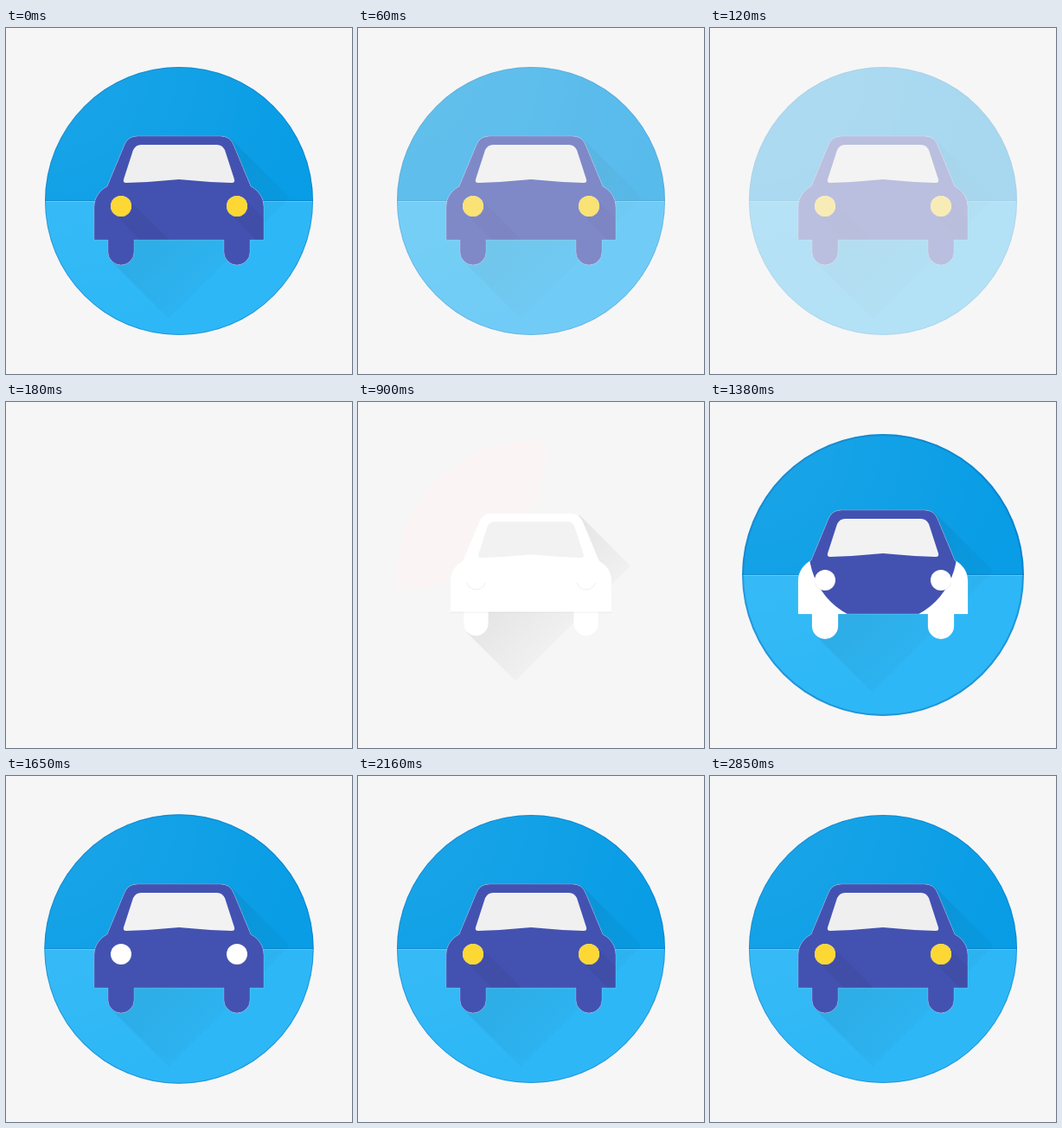
An HTML page with a canvas that plays this animation: 400x400 px, repeating every 2.97 s.

```html
<!DOCTYPE html>
<html lang="en">
<head>
<meta charset="utf-8">
<title>Car icon</title>
<style>
html, body { margin: 0; width: 100%; height: 100%; overflow: hidden; background: #f6f6f6; }
canvas { display: block; width: 400px; height: 400px; }
</style>
</head>
<body>
<canvas id="stage" width="400" height="400"></canvas>
<script>
const LOOP = 2970, STEP = 30, TAU = Math.PI * 2;
const ctx = document.getElementById('stage').getContext('2d');

const car = new Path2D('M102 245V207C102 196 108 188 117 183L137 135Q141 125 152 125H248' +
  'Q259 125 263 135L283 183C292 188 298 196 298 207V245H282V259a15 15 0 0 1-30 0V245' +
  'H148V259a15 15 0 0 1-30 0V245Z');
const glass = new Path2D('M156 135H244Q250 135 253 141L264 175Q265 179 261 179Q230 178 200 175' +
  'Q170 178 139 179Q135 179 136 175L147 141Q150 135 156 135Z');
const lamps = [133, 267], lampY = 206, lampR = 12;

const progress = (t, from, to) => Math.min(1, Math.max(0, (t - from) / (to - from)));
const mix = (a, b, p) => a + (b - a) * p;
const easeOut = (p, power) => 1 - (1 - p) ** power;
const easeInOut = p => p < 0.5 ? 2 * p * p : 1 - 2 * (1 - p) ** 2;

function circle(x, y, r) {
  const path = new Path2D();
  path.arc(x, y, r, 0, TAU);
  return path;
}

function polygon(...points) {
  const path = new Path2D();
  points.forEach(([x, y]) => path.lineTo(x, y));
  path.closePath();
  return path;
}

function fill(path, color) {
  ctx.fillStyle = color;
  ctx.fill(path);
}

function stroke(path, color, width = 1) {
  ctx.strokeStyle = color;
  ctx.lineWidth = width;
  ctx.stroke(path);
}

function clipped(path, draw) {
  ctx.save();
  ctx.clip(path);
  draw();
  ctx.restore();
}

function discRadius(t) {
  return t < 1470 ? 172 * easeOut(progress(t, 1230, 1470), 3)
    : mix(172, 155, easeInOut(progress(t, 1470, 1680)));
}

function drawDisc(t) {
  const r = discRadius(t);
  if (r <= 0) return;
  const disc = circle(200, 200, r);
  clipped(disc, () => {
    ctx.fillStyle = '#039be5';
    ctx.fillRect(0, 0, 400, 200);
    ctx.fillStyle = '#29b6f6';
    ctx.fillRect(0, 200, 400, 200);
    ctx.fillStyle = 'rgba(0,60,130,.22)';
    ctx.fillRect(0, 199, 400, 1);
    ctx.fillStyle = 'rgba(255,255,255,.2)';
    ctx.fillRect(0, 200, 400, 1);
    stroke(disc, 'rgba(10,90,170,.4)', mix(2, 4, progress(r, 155, 163)));
  });
}

function drawFinish(t) {
  if (t < 1230) {
    clipped(circle(200, 200, 155), () => fill(circle(45, 45, 173), '#faf5f4'));
    return;
  }
  const shine = ctx.createRadialGradient(45, 45, 0, 45, 45, 310);
  shine.addColorStop(0, 'rgba(255,255,255,.1)');
  shine.addColorStop(1, 'rgba(255,255,255,.02)');
  fill(circle(200, 200, discRadius(t)), shine);
}

// Long 45 degree shadow, cut off along x + y = end.
function drawShadow(end) {
  const shade = ctx.createLinearGradient(185, 185, end / 2, end / 2);
  shade.addColorStop(0, 'rgba(0,0,0,.08)');
  shade.addColorStop(1, 'rgba(0,0,0,.025)');
  fill(polygon([122, 270], [(end - 148) / 2, (end + 148) / 2],
    [(end + 132) / 2, (end - 132) / 2], [259, 127]), shade);
}

function drawLamp(x, t) {
  fill(circle(x, lampY, lampR), '#fff');
  const lit = easeOut(progress(t, 1680, 1860), 2);
  if (lit > 0) fill(circle(x, lampY, lampR * lit), '#fdd835');
  const rim = new Path2D();
  rim.arc(x, lampY, lampR, 0.3, Math.PI - 0.3);
  stroke(rim, 'rgba(0,0,0,.08)');
}

function drawCar(t) {
  const pop = easeOut(progress(t, 870, 1020), 2);
  const size = t < 1020 ? mix(0.95, 1, progress(pop, 0.36, 1)) : 1;
  ctx.save();
  ctx.translate(200, 199);
  ctx.scale(size, size);
  ctx.translate(-200, -199);

  drawShadow(mix(510, 524, progress(t, 900, 1020)));
  fill(car, '#fff');
  const spread = 134 * easeOut(progress(t, 1320, 1470), 2);
  clipped(car, () => {
    if (spread > 0) fill(circle(200, 170, spread), '#4352b1');
    const reach = 70 * easeOut(progress(t, 1950, 2310), 2);
    lamps.forEach(x => fill(polygon([x + 8.5, 197.5], [x + 8.5 + reach, 197.5 + reach],
      [x - 8.5 + reach, 214.5 + reach], [x - 8.5, 214.5]), 'rgba(0,0,0,.05)'));
  });
  stroke(car, spread > 0 ? 'rgba(255,255,255,.2)' : 'rgba(0,0,0,.015)');
  if (t < 1320) {
    ctx.fillStyle = 'rgba(0,0,0,.06)';
    ctx.fillRect(102, 245, 196, 1);
  }

  const gray = mix(242, 239, progress(t, 1950, 2310));
  fill(glass, `rgb(${gray},${gray},${gray})`);
  lamps.forEach(x => drawLamp(x, t));
  ctx.restore();
}

function draw(t) {
  ctx.fillStyle = '#f6f6f6';
  ctx.fillRect(0, 0, 400, 400);
  if (t >= 180 && t < 900) return;
  const pose = t < 180 ? LOOP : t;
  drawDisc(pose);
  drawFinish(pose);
  drawCar(pose);
  if (t < 180) {
    ctx.fillStyle = `rgba(246,246,246,${t / 180})`;
    ctx.fillRect(0, 0, 400, 400);
  }
}

const start = performance.now();
function tick() {
  const t = (performance.now() - start) % LOOP;
  draw(Math.floor(t / STEP) * STEP);
  requestAnimationFrame(tick);
}
tick();
</script>
</body>
</html>
```
